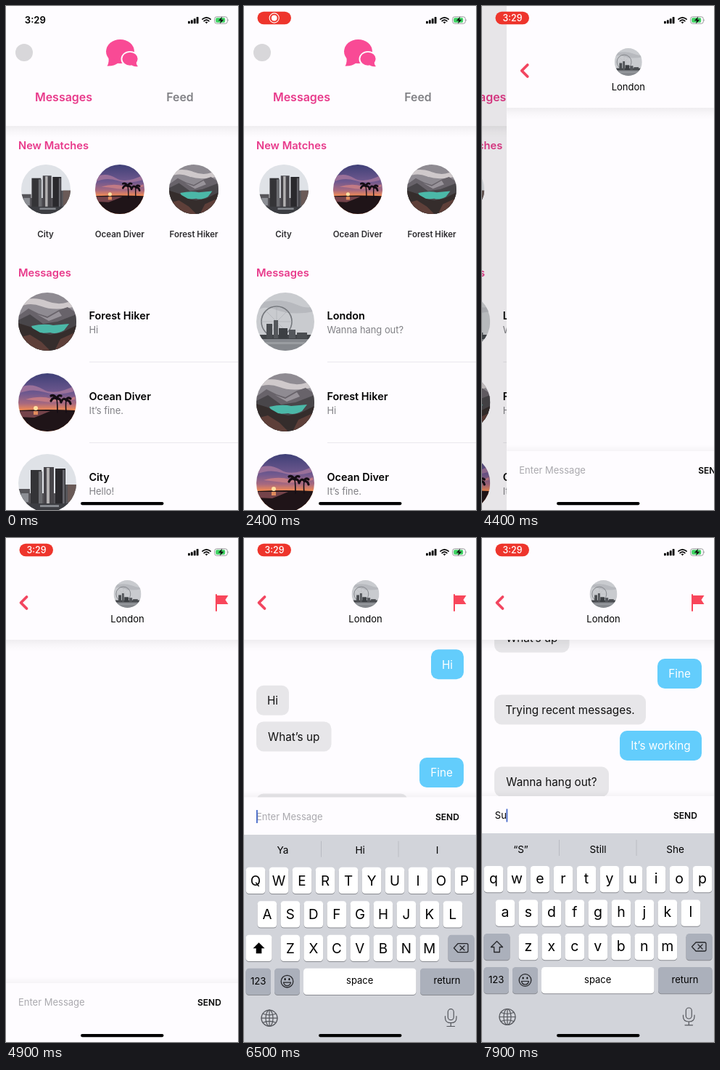
Animation of 320 by 693 pixels, one loop 8000 ms. Source, as an HTML page:

```html
<!DOCTYPE html>
<html lang="en">
<head>
<meta charset="utf-8">
<title>Chat app</title>
<style>
html, body { margin: 0; height: 100%; overflow: hidden; background: #fefcff; }
svg { display: block; width: 100vw; height: 100vh; font-family: Inter, Roboto, "Liberation Sans", sans-serif; }
.b { font-weight: 600; }
.pink { fill: #e83a8b; }
.grey { fill: #808085; }
.mid { text-anchor: middle; }
.line { fill: none; stroke-linecap: round; stroke-linejoin: round; }

.home, .dim, .chat, .bar, .keys, .log, .pill, .clock, .rec, .time, .rows { animation: 8s linear infinite; }
.home { animation-name: recede; }
.dim { animation-name: dim; }
.chat { animation-name: push; }
.bar { animation-name: lift; }
.keys { animation-name: rise; }
.log { animation-name: scroll; }
.pill { animation-name: pill; }
.clock { animation-name: clock; }
.rec { animation-name: rec; }
.time { animation-name: time; }
.rows { animation-name: insert; animation-timing-function: step-end; }

/* critically damped spring */
.home, .dim, .chat, .bar, .keys {
  animation-timing-function: linear(0, .232, .545, .758, .879, .942, .973, .988, .994, .998, 1);
}
@keyframes recede { 0%, 52.375% { transform: none; } 58.625%, 100% { transform: translateX(-96px); } }
@keyframes dim { 0%, 52.375% { opacity: 0; } 58.625%, 100% { opacity: .1; } }
@keyframes push { 0%, 52.375% { transform: translateX(320px); } 58.625%, 100% { transform: none; } }
@keyframes lift { 0%, 76.25% { transform: none; } 82.5%, 100% { transform: translateY(-257px); } }
@keyframes rise { 0%, 76.25% { transform: translateY(693px); } 82.5%, 100% { transform: translateY(406px); } }
@keyframes scroll {
  0%, 84% { transform: none; animation-timing-function: ease-in-out; }
  88%, 100% { transform: translateY(-136px); }
}
@keyframes insert { 0% { transform: translateY(-111px); } 30%, 100% { transform: none; } }
@keyframes pill { 0%, 4% { opacity: 0; } 6.5%, 100% { opacity: 1; } }
@keyframes clock { 0%, 4% { opacity: 1; } 6.5%, 100% { opacity: 0; } }
@keyframes rec { 0%, 39.5% { opacity: 1; } 43%, 100% { opacity: 0; } }
@keyframes time { 0%, 39.5% { opacity: 0; } 43%, 100% { opacity: 1; } }
</style>
</head>
<body>
<script>
const rules = [];

// Visible only between two times in ms.
function show(from, to, body) {
  const name = 'show' + rules.length;
  rules.push(`@keyframes ${name}{0%{visibility:hidden}${from / 80}%{visibility:visible}${to / 80}%{visibility:hidden}}`);
  return `<g style="animation:${name} 8s step-end infinite">${body}</g>`;
}
const text = (x, y, size, str, cls = '', attrs = '') =>
  `<text x="${x}" y="${y}" font-size="${size}" class="${cls}" ${attrs}>${str}</text>`;
const rect = (x, y, w, h, fill, r = 0) =>
  `<rect x="${x}" y="${y}" width="${w}" height="${h}" rx="${r}" fill="${fill}"/>`;
const path = (d, fill) => `<path d="${d}" fill="${fill}"/>`;
const line = (d, color, width) => `<path d="${d}" class="line" stroke="${color}" stroke-width="${width}"/>`;
const photo = (id, x, y, r) => `<use href="#${id}" transform="translate(${x} ${y}) scale(${r / 40})"/>`;
const PAPER = '#fefcff';

// Pictures drawn in a disc of radius 40
const scenes = {
  city: rect(-40, -40, 80, 80, '#dfe2e7') +
    path('M-40 8H-24V14H24V2H40V40H-40Z', '#56555a') +
    rect(-23, -18, 15, 50, '#343437') + rect(-12, -16, 5, 46, '#6b6c70') +
    rect(-5, -22, 14, 54, '#47454a') + rect(-1, -21, 4, 50, '#b3b1b2') +
    rect(11, -20, 14, 52, '#2a292d') + rect(21, -18, 3, 48, '#64646a') + rect(28, 2, 12, 24, '#6a5a57') +
    rect(-36, 14, 10, 12, '#8c8e94') + rect(-40, 28, 80, 12, '#3c3d42') + rect(-10, 30, 26, 3, '#85888e'),
  beach: rect(-40, -40, 80, 80, 'url(#dusk)') +
    path('M-40-20Q-22-28-6-18T40-24V-16Q14-8-4-14T-40-12Z', '#9a7099') +
    path('M-30-4Q-10-10 6-5T38-8V-4Q12 1-4-1T-30-4Z', '#c27a85') +
    path('M-40 11Q0 9 40 11V40H-40Z', '#1f1418') + path('M-40 12H4L-8 17-18 21-40 20Z', '#74434a') +
    '<circle cx="-16" cy="8" r="3" fill="#ffe0a0"/>' + rect(-19, 12, 6, 5, '#e08a5c') +
    line('M14 14Q14 2 13-5M26 14Q25 4 26-3', '#140d14', 1.6) +
    line('M13-5Q8-8 5-2M13-5Q9-11 5-9M13-5Q15-11 19-9M13-5Q18-6 19 0M26-3Q22-7 20-2M26-3Q28-8 32-5M26-3Q31-3 32 2', '#140d14', 3.2),
  nature: rect(-40, -40, 80, 80, '#8f8b92') +
    path('M-40-27Q-20-36 0-28T40-32V-21Q10-14-8-21T-40-19Z', '#cfc9cb') +
    path('M-40-8L-26-18-12-11 0-7 16-16 28-20 40-12V40H-40Z', '#68636a') +
    path('M-14-10L0-5 16-14 20-8 2-1Z', '#98939a') +
    path('M-40-2L-24-10-6 3 14 0 40-10V40H-40Z', '#49464a') +
    path('M-22 6Q-4 2 8 5L30 3 23 12Q12 18 4 15-8 17-18 14Z', '#4bb8a8') +
    path('M-40 2L-24 7-10 15 4 18 20 15 40 5V40H-40Z', '#352d2c') +
    path('M-40 22L-24 18-8 28 4 40H-40ZM18 24L40 14V40H10Z', '#5e3f39'),
  london: rect(-40, -40, 80, 80, '#c9cbcf') +
    path('M-40-24Q-10-34 14-24T40-26V-14Q10-8-12-16T-40-12Z', '#b7b9be') +
    rect(-40, 23, 80, 17, '#85888d') + rect(-40, 28, 80, 3, '#9a9da1') +
    '<circle cx="-12" cy="0" r="21" fill="none" stroke="#73767b" stroke-width="1.6"/>' +
    line('M-12 0L-22 23M-12 0L-2 23M-33 0H9M-12-21V21M-27-15L3 15M3-15L-27 15', '#a3a5aa', .5) +
    rect(-40, 18, 80, 6, '#414448') + rect(-26, 3, 8, 20, '#494c50') + rect(-16, -2, 6, 25, '#54575b') +
    rect(-9, 9, 12, 14, '#3c3f43') + rect(5, 11, 9, 12, '#54575c') + rect(16, 15, 14, 8, '#4a4d51')
};

const defs = `<defs>
  <clipPath id="disc"><circle r="40"/></clipPath>
  <linearGradient id="dusk" x2="0" y2="1">
    <stop stop-color="#3f4077"/><stop offset=".35" stop-color="#70598f"/>
    <stop offset=".52" stop-color="#a8697f"/><stop offset=".63" stop-color="#f08a55"/></linearGradient>
  <linearGradient id="below" x2="0" y2="1">
    <stop stop-opacity=".06"/><stop offset=".5" stop-opacity=".022"/><stop offset="1" stop-opacity="0"/></linearGradient>
  <linearGradient id="above" x2="0" y2="1">
    <stop stop-opacity="0"/><stop offset="1" stop-opacity=".035"/></linearGradient>
  ${Object.entries(scenes).map(([id, art]) => `<g id="${id}" clip-path="url(#disc)">${art}</g>`).join('')}
</defs>`;

// Home screen
const match = ([id, name], i) => photo(id, 55 + 102 * i, 252, 34) +
  text(54.5 + 102.3 * i, 317.5, 11.5, name, 'b mid', 'fill="#2c2b2e"');

function row([id, name, note], i) {
  const y = 434 + 111 * i;
  const body = photo(id, 57, y, 40) + text(114.5, y - 3.5, 14.4, name, 'b') +
    text(114.5, y + 15.5, 12.9, note, 'grey') + rect(115, y + 55, 205, 1, '#eae8ed');
  return i ? body : show(2400, 8000, body);
}

const home = `<g class="home">
  ${rect(0, 0, 320, 693, PAPER)}
  ${rect(0, 165, 320, 16, 'url(#below)')}
  <circle cx="25" cy="64" r="12" fill="#d8d7da"/>
  <g fill="#f94a95">
    <ellipse cx="157.5" cy="62.5" rx="19.5" ry="16.5"/>
    <path d="M141 68Q143 77 139.5 82.5 149 83 155 78Z"/>
    <ellipse cx="171" cy="73" rx="12.5" ry="11" fill="${PAPER}"/>
    <ellipse cx="171" cy="72.7" rx="10.6" ry="9"/>
    <path d="M180 76Q179 80 182 83 176 84 172 80Z"/>
  </g>
  ${text(79.5, 130.5, 16, 'Messages', 'b pink mid')}
  ${text(240, 130.5, 15.8, 'Feed', 'b grey mid')}
  ${text(17, 197, 14.7, 'New Matches', 'b pink')}
  ${[['city', 'City'], ['beach', 'Ocean Diver'], ['nature', 'Forest Hiker']].map(match).join('')}
  ${text(17, 371.5, 14.7, 'Messages', 'b pink')}
  <g class="rows">${[
    ['london', 'London', 'Wanna hang out?'],
    ['nature', 'Forest Hiker', 'Hi'],
    ['beach', 'Ocean Diver', 'It’s fine.'],
    ['city', 'City', 'Hello!']
  ].map(row).join('')}</g>
</g>
<rect class="dim" width="320" height="693"/>`;

// Chat screen; positive width is received, negative is sent
function bubble([str, width], i) {
  const w = Math.abs(width), x = width > 0 ? 17 : 303 - w, y = 153.3 + 49.55 * i;
  return rect(x, y, w, 41, width > 0 ? '#e7e6e9' : '#63cdfc', 10) +
    text(x + w / 2, y + 26.2, 15.3, str, 'mid', `fill="${width > 0 ? '#111' : '#fff'}"`);
}
const caret = x => rect(x, 629.5, 1.8, 18, '#4669c9');

const chat = `<g class="chat">
  ${rect(0, 0, 320, 693, PAPER)}
  ${show(5000, 8000, `<g class="log">${[
    ['Hi', -45], ['Hi', 45], ['What’s up', 103.5], ['Fine', -61],
    ['Trying recent messages.', 209], ['It’s working', -113], ['Wanna hang out?', 158]
  ].map(bubble).join('')}</g>`)}
  ${rect(0, 0, 320, 140, PAPER)}
  ${rect(0, 140, 320, 16, 'url(#below)')}
  ${line('M28.5 81L20.5 89 28.5 97', '#f2455f', 3.8)}
  ${photo('london', 167.5, 77, 19)}
  ${text(167.5, 115.7, 13, 'London', 'mid')}
  ${line('M290 78V100', '#f8465b', 2)}
  ${path('M290 79H306.5L302.5 85 306.5 91H290Z', '#f8465b')}
  <g class="bar">
    ${rect(0, 603, 320, 9, 'url(#above)')}
    ${rect(0, 612, 320, 81, PAPER)}
    ${show(0, 7500, text(17, 643.2, 13, 'Enter Message', '', 'fill="#aaa9ae"'))}
    ${show(7500, 7850, text(17.8, 643.2, 13, 'S') + caret(26))}
    ${show(7850, 8000, text(17.8, 643.2, 13, 'Su') + caret(33.5))}
    ${show(6300, 6950, caret(17))}
    ${show(7200, 7500, caret(17))}
    ${text(264, 643, 12, 'SEND', 'b')}
  </g>
</g>`;

// Keyboard, measured from its own top edge
const SLATE = '#abb0bb', INK = '#26272b';
const key = (x, y, w, fill = '#fff') => rect(x, y + 1, w, 36.3, '#898b91', 4.4) + rect(x, y, w, 36.3, fill, 4.4);
const layout = [['qwertyuiop', 2.7, 45], ['asdfghjkl', 18.6, 91.5], ['zxcvbnm', 50.5, 138]];
const eachKey = draw => layout.map(([row, x0, y]) =>
  [...row].map((c, i) => draw(c, x0 + 32 * i, y)).join('')).join('');
const caps = eachKey((c, x, y) => text(x + 13.3, y + 25.3, 18.8, c.toUpperCase(), 'mid'));
const lower = eachKey((c, x, y) => text(x + 13.3, y + 23.5, 19.5, c, 'mid'));
const hints = words => words.map((w, i) => text(53.5 + 106.6 * i, 26.8, 13.6, w, 'mid')).join('');
const arrow = 'M20.5 148.5L28.5 156.5H24.3V163.5H16.7V156.5H12.5Z';

const keys = `<g class="keys">
  ${rect(0, 0, 320, 290, '#d2d4da')}
  ${rect(106, 9, 1, 22, '#b9bbc2')}${rect(212.5, 9, 1, 22, '#b9bbc2')}
  ${eachKey((c, x, y) => key(x, y, 26.6))}
  ${key(281.5, 138, 36, SLATE)}
  ${key(2.5, 184, 34.5, SLATE)}${key(42, 184, 35, SLATE)}${key(82, 184, 155.5)}${key(243, 184, 74.5, SLATE)}
  ${show(0, 7500, key(2.5, 138, 36) + path(arrow, '#000') + caps + hints(['Ya', 'Hi', 'I']))}
  ${show(7500, 8000, key(2.5, 138, 36, SLATE) + line(arrow, INK, 1.3) + lower + hints(['“S”', 'Still', 'She']))}
  ${line('M295 150H307Q309 150 309 152V160Q309 162 307 162H295L289.5 156ZM298 153L304 159M304 153L298 159', INK, 1.3)}
  ${text(19.7, 206.3, 13.2, '123', 'mid')}
  ${text(159.7, 205.8, 13, 'space', 'mid')}
  ${text(280, 205.8, 13, 'return', 'mid')}
  <circle cx="59.5" cy="202" r="8.3" class="line" stroke="${INK}" stroke-width="1.3"/>
  <ellipse cx="56.6" cy="199" rx="1" ry="1.6"/><ellipse cx="62.4" cy="199" rx="1" ry="1.6"/>
  ${line('M54.5 203.5H64.5Q63.5 208 59.5 208T54.5 203.5Z', INK, 1.2)}
  <g class="line" stroke="#55575d" stroke-width="1.2">
    <circle cx="35" cy="252.5" r="11"/><ellipse cx="35" cy="252.5" rx="5" ry="11"/>
    <path d="M24 252.5H46M35 241.5V263.5M26.5 246.5Q35 250 43.5 246.5M26.5 258.5Q35 255 43.5 258.5"/>
    <rect x="281.3" y="240" width="8" height="15" rx="4"/>
    <path d="M277.5 250V252Q277.5 259 285.3 259T293 252V250M285.3 259V263.5M280 263.8H290.5"/>
  </g>
</g>`;

const status = `
  ${text(25.8, 24, 13.1, '3:29', 'b clock')}
  <g class="pill">
    ${rect(18.5, 7.8, 46.5, 17.5, '#ee352c', 8.7)}
    <g class="rec"><circle cx="41.7" cy="16.5" r="6.6" fill="none" stroke="#fff" stroke-width="1.1"/>
      <circle cx="41.7" cy="16.5" r="3.9" fill="#fff"/></g>
    ${text(42, 21, 12.4, '3:29', 'mid time', 'fill="#fff" font-weight="500"')}
  </g>
  ${[3.5, 5, 7, 9.2].map((h, i) => rect(251 + 3.9 * i, 24.2 - h, 2.8, h, '#000', .7)).join('')}
  ${line('M271 18.2Q276.5 13.4 282 18.2M273.2 20.6Q276.5 17.8 279.8 20.6', '#000', 1.7)}
  ${path('M274.6 22.3Q276.5 20.8 278.4 22.3L276.5 24.3Z', '#000')}
  <rect x="287.7" y="14.8" width="17.6" height="9.4" rx="2.8" fill="none" stroke="#98989c"/>
  ${rect(289.2, 16.3, 13, 6.4, '#3fd363', 1.6)}
  ${path('M306.4 17.8Q308 19.5 306.4 21.2Z', '#98989c')}
  ${path('M298.2 14.5L292.8 20.2H296.2L295 24.6 300.4 18.8H297Z', '#111')}
  ${rect(103, 682, 114.5, 4.2, '#000', 2.1)}`;

const scene = defs + home + chat + keys + status;
document.body.innerHTML =
  `<style>${rules.join('')}</style><svg viewBox="0 0 320 693" preserveAspectRatio="none">${scene}</svg>`;
</script>
</body>
</html>
```
